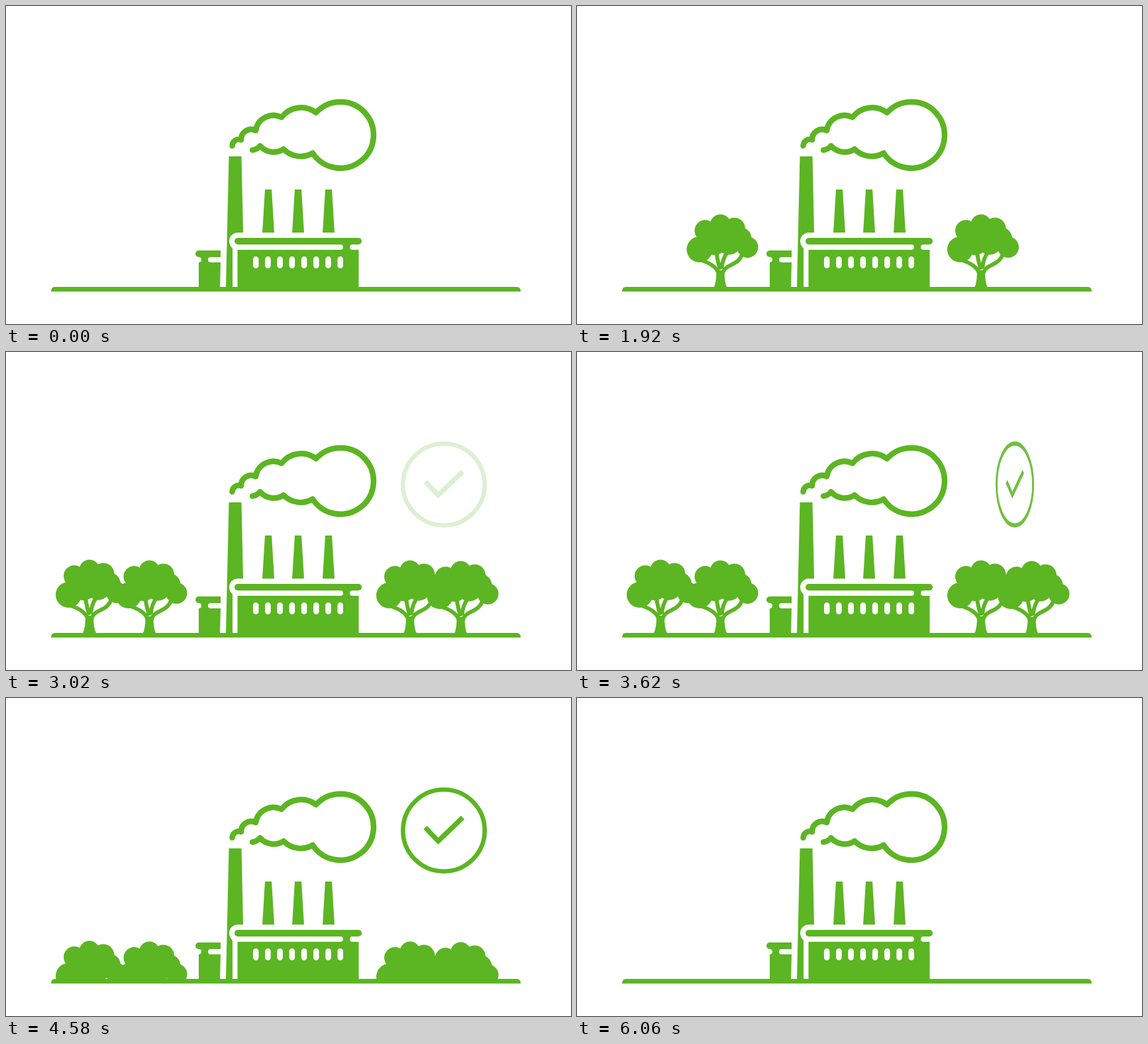
Write an HTML page that moves like this. It is 853 px wide and 480 px high and loops after 6.12 s.

```html
<!DOCTYPE html>
<html lang="en">
<head>
<meta charset="utf-8">
<title>Green factory</title>
<style>
  html, body { margin: 0; width: 100%; height: 100%; overflow: hidden; background: #fff; }
  svg { display: block; width: 100%; height: 100%; }
  .line { fill: none; stroke: #5cb522; }
</style>
</head>
<body>
<svg viewBox="0 0 853 480" fill="#5cb522">
  <defs>
    <clipPath id="aboveGround"><rect width="853" height="430"/></clipPath>
    <g id="tree">
      <circle cx="578.5" cy="367.5" r="19.5"/>
      <circle cx="587" cy="339" r="16"/>
      <circle cx="610" cy="330" r="15.5"/>
      <circle cx="631" cy="336" r="16.5"/>
      <circle cx="640" cy="351" r="17"/>
      <circle cx="651" cy="364" r="16"/>
      <circle cx="601" cy="357" r="19"/>
      <circle cx="623" cy="357" r="18.5"/>
      <path d="M604 399Q604 418 600 425H620Q616 418 616 399Z"/>
      <path class="line" stroke-width="6" d="M582 384Q603 391 607 403M604 372Q606 387 610 398M621 371Q613 381 612 396M643 374Q640 385 626 391Q614 396 613 405"/>
    </g>
    <path id="stack" d="M391 277H401L405 342H387Z"/>
  </defs>

  <path d="M68 431Q68 424 74 424H771Q777 424 777 431Z"/>

  <path d="M336.5 227H355.5L358 342H350A13 13 0 0 0 337 355Q337 361 342 366V425H332Z"/>
  <use href="#stack"/>
  <use href="#stack" x="45"/>
  <use href="#stack" x="91"/>

  <rect x="345" y="350" width="192" height="10" rx="5"/>
  <path d="M505 360a4 4 0 0 1 0 8H523a4 4 0 0 1 0-8Z"/>
  <rect x="349.5" y="368" width="183" height="57"/>
  <path id="windows" fill="none" stroke="#fff" stroke-width="8.5" stroke-linecap="round"/>

  <path d="M324 369H291a5 5 0 0 0 0 10H324Z"/>
  <path d="M291 379a4 4 0 0 1 0 8H309a4 4 0 0 1 0-8Z"/>
  <path d="M291 387H324L323 425H291Z"/>

  <path class="line" stroke-width="8.5" stroke-linecap="round" stroke-linejoin="round"
    d="M341.5 211A10 10 0 0 1 355 202A15 15 0 0 1 377 188A27 27 0 0 1 416 168A37 37 0 0 1 468 161A50 50 0 1 1 463 222A36 36 0 0 1 419 216A27 27 0 0 1 383.5 211A17 17 0 0 1 372 217.5"/>

  <g id="trees" clip-path="url(#aboveGround)"></g>

  <g id="badge" class="line" opacity="0">
    <circle r="61.7" stroke-width="6.6"/>
    <path stroke-width="7.5" d="M-28-4.5L-8.5 16L28.5-19.5"/>
  </g>
</svg>
<script>
  const LOOP = 6120, STEP = 60, DEPTH = 118;
  // Bursts of motion: [first step in ms, index of last step]
  const BURSTS = [[330, 10], [1320, 10], [2240, 49], [5640, 7]];
  const RISE = 660, SINK_AT = 3748, SINK = 1754;
  const SWIVEL_AT = 2840, SWIVEL = 908, FADE_AT = 5600, FADE = 450;

  const progress = (t, start, length) => Math.min(1, Math.max(0, (t - start) / length));
  const easeOut = p => 1 - (1 - p) ** 2;
  const easeInOut = p => p < .5 ? 2 * p * p : 1 - 2 * (1 - p) ** 2;

  document.getElementById('windows').setAttribute('d',
    Array.from({ length: 8 }, (_, i) => `M${377.2 + i * 18.22} 382.3v9.4`).join(''));

  const grove = document.getElementById('trees');
  const badge = document.getElementById('badge');
  const trees = [[0, 0, 280], [-393.5, 0, 1270], [-484, -1, 2190], [76.5, 1, 2190]].map(([x, y, start]) => {
    const node = document.createElementNS('http://www.w3.org/2000/svg', 'use');
    node.setAttribute('href', '#tree');
    grove.append(node);
    return { node, x, y, start };
  });

  function stepped(t) {
    const burst = BURSTS.filter(([first]) => first <= t).pop();
    if (!burst) return 0;
    const [first, last] = burst;
    return first + STEP * Math.min(last, Math.floor((t - first) / STEP));
  }

  function draw(now) {
    const t = stepped(now % LOOP);
    const sunk = easeInOut(progress(t, SINK_AT, SINK));
    for (const { node, x, y, start } of trees) {
      const hidden = 1 - easeOut(progress(t, start, RISE)) + sunk;
      node.setAttribute('transform', `translate(${x} ${y + DEPTH * hidden})`);
    }
    const turn = progress(t, SWIVEL_AT, SWIVEL);
    const width = Math.sin(2.5 * Math.PI * turn);
    badge.setAttribute('transform', `translate(661 200) scale(${width} 1)`);
    badge.setAttribute('opacity', turn * (1 - progress(t, FADE_AT, FADE)));
  }

  const origin = performance.now();
  function tick() {
    draw(performance.now() - origin);
    requestAnimationFrame(tick);
  }
  tick();
</script>
</body>
</html>
```
